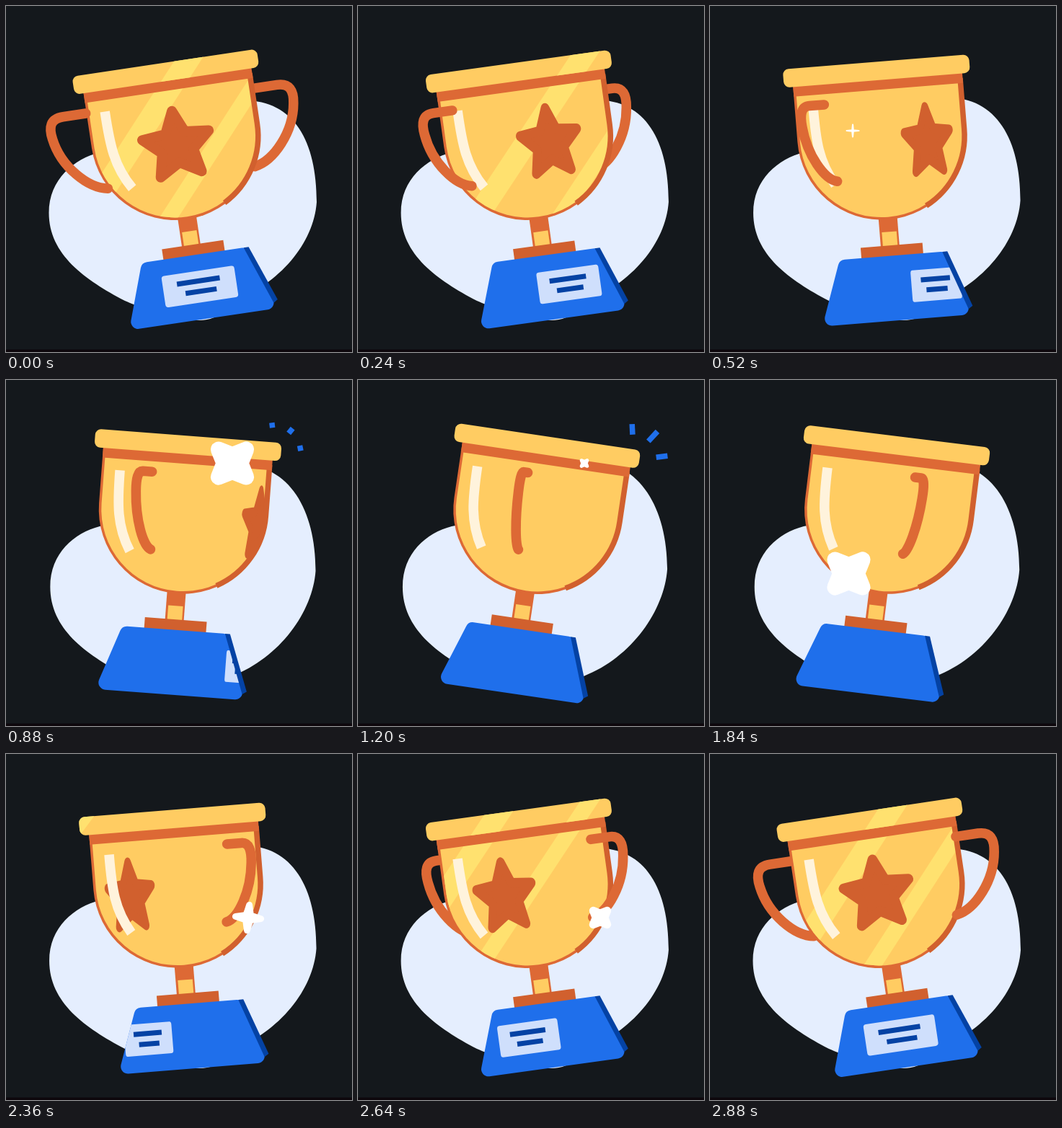
These frames come from a looping animation (480 px wide and 480 px high, 2.92 s). An HTML page with a canvas:

```html
<!DOCTYPE html>
<html lang="en">
<head>
<meta charset="utf-8">
<title>Trophy</title>
<style>
html, body { margin: 0; width: 100%; height: 100%; overflow: hidden; background: #14181c; }
canvas { display: block; width: 100vmin; height: 100vmin; }
</style>
</head>
<body>
<canvas id="stage"></canvas>
<script>
const LOOP = 2920, STEP = 40, HALF = 1440;
const PIVOT = [242, 229];
const ORANGE = '#dd6935', RUST = '#d1602e', GOLD = '#ffcc62', SHINE = '#ffe16f';
const BLUE = '#1f6feb', NAVY = '#0442a4', PALE = '#e5eefe', LABEL = '#cfdffc';

const canvas = document.getElementById('stage');
const ctx = canvas.getContext('2d');
const ratio = window.devicePixelRatio || 1;
canvas.width = canvas.height = 480 * ratio;

const clamp = (v) => Math.max(0, Math.min(1, v));
const span = (t, a, b) => clamp((t - a) / (b - a));
const smooth = (x) => x * x * (3 - 2 * x);
const mix = (a, b, k) => a + (b - a) * k;

// cubic-bezier(.56, 0, .44, 1)
function swingEase(x) {
  let lo = 0, hi = 1;
  for (let i = 0; i < 24; i++) {
    const s = (lo + hi) / 2, r = 1 - s;
    if (3 * r * r * s * 0.56 + 3 * r * s * s * 0.44 + s * s * s < x) lo = s;
    else hi = s;
  }
  return smooth(lo);
}

function fill(path, color) {
  ctx.fillStyle = color;
  ctx.fill(path);
}

function stroke(path, color, width, cap = 'butt') {
  ctx.strokeStyle = color;
  ctx.lineWidth = width;
  ctx.lineCap = cap;
  ctx.lineJoin = 'round';
  ctx.stroke(path);
}

function box(x, y, w, h, color, r = 0) {
  const p = new Path2D();
  p.roundRect(x, y, w, h, r);
  fill(p, color);
}

function scoped(draw) {
  ctx.save();
  draw();
  ctx.restore();
}

// Star polygon with alternating outer and inner radius
function starPath(points, outer, inner) {
  const p = new Path2D();
  for (let i = 0; i < points * 2; i++) {
    const r = i % 2 ? inner : outer, a = Math.PI * i / points;
    p.lineTo(r * Math.sin(a), -r * Math.cos(a));
  }
  p.closePath();
  return p;
}

function roundedPoly(points, r) {
  const p = new Path2D(), n = points.length;
  const [a, b] = [points[n - 1], points[0]];
  p.moveTo((a[0] + b[0]) / 2, (a[1] + b[1]) / 2);
  points.forEach((pt, i) => p.arcTo(...pt, ...points[(i + 1) % n], r));
  p.closePath();
  return p;
}

const cupPath = (r) => new Path2D(
  `M${-r} -127V-49.5A${r} ${r} 0 0 0 ${r} -49.5V-127Z`);
const CUP = cupPath(117), CUP_INNER = cupPath(113.5);
const CUP_SHADE = new Path2D('M115 -120V-49.5A115 115 0 0 1 54 52.5');
const GLOSS = new Path2D('M-91.5 -97C-91.5 -50 -90 -20 -69.5 13.5');
const RIM = new Path2D();
RIM.roundRect(-129.5, -152, 259, 25.5, 8);
const BASE = roundedPoly([[-72, 118], [76, 118], [105, 208], [-103, 208]], 10);
const SIDE = new Path2D('M71 118L78 118L107 196L101 200Z');
const BADGE = starPath(5, 49, 23);

// Shine bands at rest: left and right x on the pivot line
const BANDS = [[-120, -79], [14, 43]];
const BAND_SLOPE = 0.88;

// Sparkles: x, y, start, peak, end
const SPARKLES = [
  [198, 173, 475, 655, 870],
  [314, 115.5, 700, 880, 1285],
  [192.5, 268.5, 1660, 1840, 2240],
  [336, 227, 2255, 2435, 2850]
];

// Dashes: inner end, outer end
const DASHES = [
  [115, -172, 112, -187],
  [138, -166, 149, -182],
  [152, -145.5, 168, -150]
];

function drawBackdrop(lean) {
  ctx.fillStyle = '#14181c';
  ctx.fillRect(0, 0, 480, 480);
  ctx.fillStyle = '#0d070c';
  ctx.fillRect(0, 476.5, 480, 3.5);
  const left = mix(59.5, 62, lean), right = mix(431, 429, lean);
  const top = mix(131, 112, lean), mid = mix(272, 262, lean);
  fill(new Path2D(
    `M${left} 287C${left} 240 95 212 130 203C200 190 240 ${top} ${mix(330, 321, lean)} ${top}
     C${mix(400, 391, lean)} ${top} ${right} ${mid - 84} ${right} ${mid}
     C${right - 4} ${mid + 57} 380 385 313 411C306 414 300 436 268 436
     C225 436 180 415 165 409C110 380 ${left} 345 ${left} 287Z`), PALE);
}

function drawDashes(t) {
  const head = smooth(span(t, 510, 1300)), tail = smooth(span(t, 1280, 1740));
  if (head <= tail) return;
  for (const [x1, y1, x2, y2] of DASHES) {
    const p = new Path2D();
    p.moveTo(mix(x1, x2, tail), mix(y1, y2, tail));
    p.lineTo(mix(x1, x2, head), mix(y1, y2, head));
    stroke(p, BLUE, 7.5);
  }
}

function drawHandle(s) {
  const pt = (x, y) => `${x * s} ${y} `;
  stroke(new Path2D('M' + pt(-118, -98.5) + 'L' + pt(-150, -98.5) +
    'C' + pt(-168, -98.5) + pt(-172, -87) + pt(-169, -70) +
    'C' + pt(-163, -30) + pt(-130, 5) + pt(-103, 9)), ORANGE, 13.5, 'round');
}

function drawBase(wrapped, squash) {
  box(-13.5, 60, 26, 46, ORANGE);
  box(-10.5, 84.5, 20.5, 20, GOLD);
  box(-41.5, 103.5, 86, 16, RUST);
  fill(BASE, BLUE);
  scoped(() => {
    ctx.clip(BASE);
    ctx.translate(3 + 0.108 * wrapped, 0);
    ctx.scale(squash, 1);
    box(-51, 140.5, 102, 44, LABEL, 4);
    box(-31, 151, 60, 7, NAVY);
    box(-21, 165.5, 43.5, 7, NAVY);
  });
  fill(SIDE, NAVY);
}

function drawBands(shift) {
  for (const [a, b] of BANDS) {
    const edge = (x, y) => `${x + shift - BAND_SLOPE * y} ${y}`;
    fill(new Path2D(`M${edge(a, -160)}L${edge(b, -160)}L${edge(b, 80)}L${edge(a, 80)}Z`), SHINE);
  }
}

function drawCup(wrapped, squash) {
  const late = wrapped < 0 ? Math.min(0, wrapped + 40) : wrapped;
  const shift = 290 * Math.sign(late) * (late / 525) ** 2;
  const shining = Math.abs(late) < 525;

  fill(CUP, ORANGE);
  fill(CUP_INNER, GOLD);
  scoped(() => {
    ctx.clip(CUP_INNER);
    if (shining) drawBands(shift);
    if (squash > 0.34) scoped(() => {
      ctx.translate(0.5 + 0.12 * wrapped, -35);
      ctx.scale(squash, 1);
      fill(BADGE, RUST);
      stroke(BADGE, RUST, 14);
    });
  });
  stroke(GLOSS, '#fff3dc', 13.5);
  stroke(CUP_SHADE, RUST, 7.5);
  box(-117, -128, 235.5, 15, ORANGE);
  fill(RIM, GOLD);
  if (shining) scoped(() => {
    ctx.clip(RIM);
    drawBands(shift);
  });
}

function drawSparkle(t, [x, y, start, peak, end]) {
  if (t <= start || t >= end) return;
  const growing = t < peak;
  const k = growing ? span(t, start, peak) : 1 - span(t, peak, end);
  const body = growing ? k ** 1.7 : k;
  scoped(() => {
    ctx.translate(x, y);
    ctx.rotate(Math.PI / 4 * (growing ? k ** 4 : 1));
    const w = 22 * body;
    const p = starPath(4, 38 * k - w / 2, 11.5 * body);
    fill(p, '#fff');
    stroke(p, '#fff', w);
  });
}

function render(t) {
  const lean = swingEase(clamp(1 - Math.abs(1 - t / HALF)));
  const turn = 1 - 2 * t / LOOP;
  const wrapped = t > LOOP / 2 ? t - LOOP : t;
  const squash = Math.max(0.01, 1 - Math.abs(wrapped) / 1600);

  ctx.setTransform(ratio, 0, 0, ratio, 0, 0);
  drawBackdrop(lean);
  scoped(() => {
    ctx.translate(...PIVOT);
    ctx.rotate(mix(-8.5, 9.05, lean) * Math.PI / 180);
    drawDashes(t);
    drawHandle(-turn);
    drawBase(wrapped, squash);
    drawCup(wrapped, squash);
    drawHandle(turn);
  });
  SPARKLES.forEach((s) => drawSparkle(t, s));
}

const begin = performance.now();
function tick() {
  const t = (performance.now() - begin) % LOOP;
  render(Math.floor(t / STEP) * STEP);
  requestAnimationFrame(tick);
}
tick();
</script>
</body>
</html>
```
